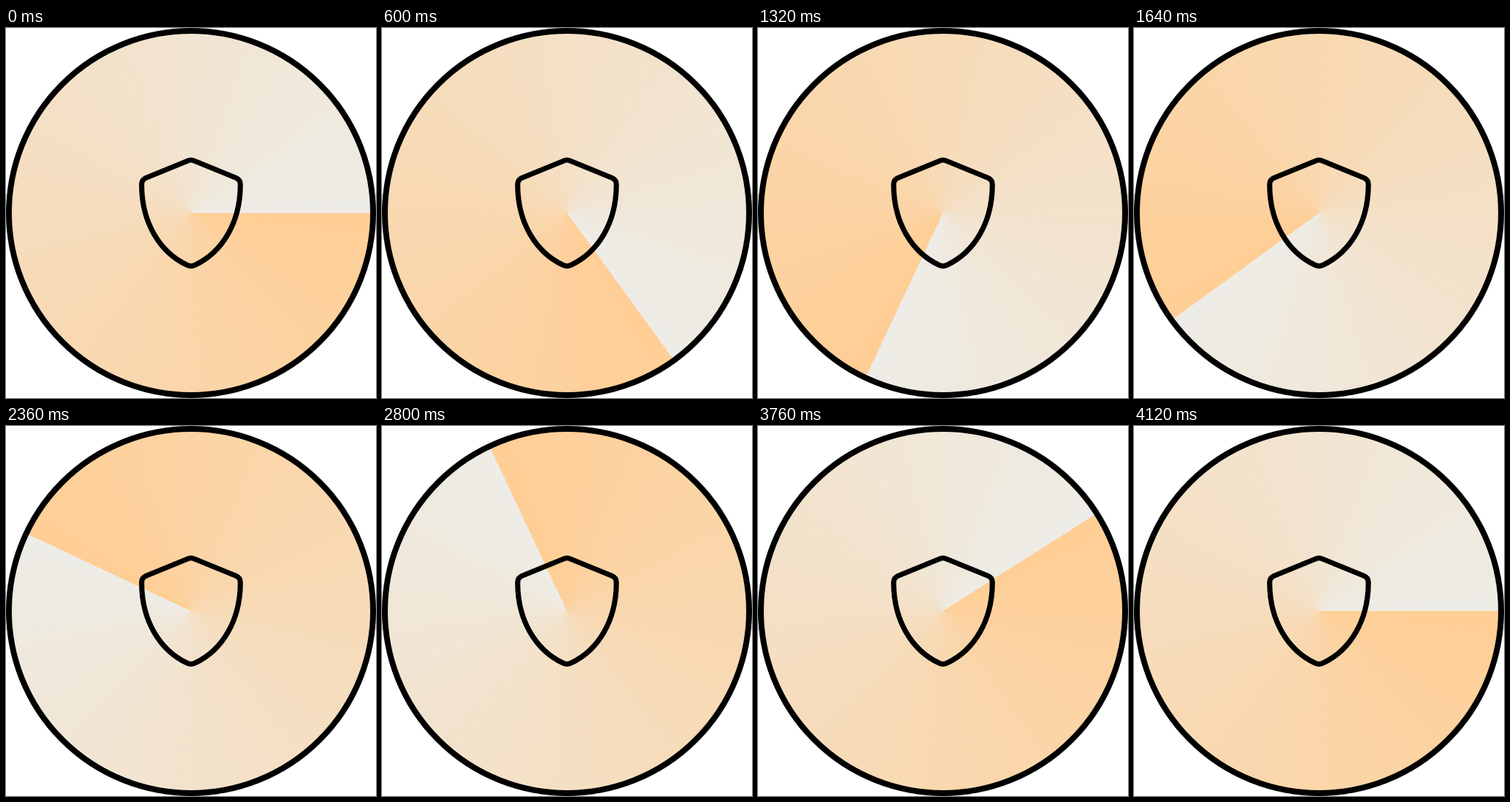
Write an HTML page that moves like this. It is 512 px wide and 512 px high and loops after 4220 ms.

```html
<!DOCTYPE html>
<html lang="en">
<head>
<meta charset="utf-8">
<title>Shield sweep</title>
<style>
  html, body { margin: 0; width: 100%; height: 100%; overflow: hidden; background: #fff; }
  #stage { position: relative; width: 512px; height: 512px; }
  #sweep { position: absolute; inset: 4px; border-radius: 50%; }
  svg { position: absolute; inset: 0; fill: none; stroke: #000; }
</style>
</head>
<body>
<div id="stage">
  <div id="sweep"></div>
  <svg width="512" height="512" viewBox="0 0 512 512">
    <circle cx="256" cy="256" r="252" stroke-width="8"/>
    <path stroke-width="7.2" stroke-linejoin="round" d="
      M251 184 Q256 181.5 261 184 L318.5 207.5 Q324.5 210 324.3 217
      C324.3 268 300 310 261.5 328 Q256 330.8 250.5 328
      C212 310 187.7 268 187.7 217 Q187.5 210 193.5 207.5 Z"/>
  </svg>
</div>
<script>
  const LOOP = 4220, TICK = 40, STEPS = 100;
  const HOLDS = [22, 50, 78]; // ticks on which the sweep pauses
  const sweep = document.getElementById('sweep');

  function angleAt(ms) {
    const tick = Math.floor(ms / TICK + 1e-6);
    const step = tick - HOLDS.filter(hold => hold <= tick).length;
    return Math.min(step, STEPS) * 360 / STEPS;
  }

  function draw(ms) {
    const start = 90 + angleAt(ms);
    sweep.style.background = `conic-gradient(from ${start}deg, #ffce95, #edece6)`;
  }

  const origin = performance.now();
  function frame() {
    draw((performance.now() - origin) % LOOP);
    requestAnimationFrame(frame);
  }
  draw(0);
  requestAnimationFrame(frame);
</script>
</body>
</html>
```
